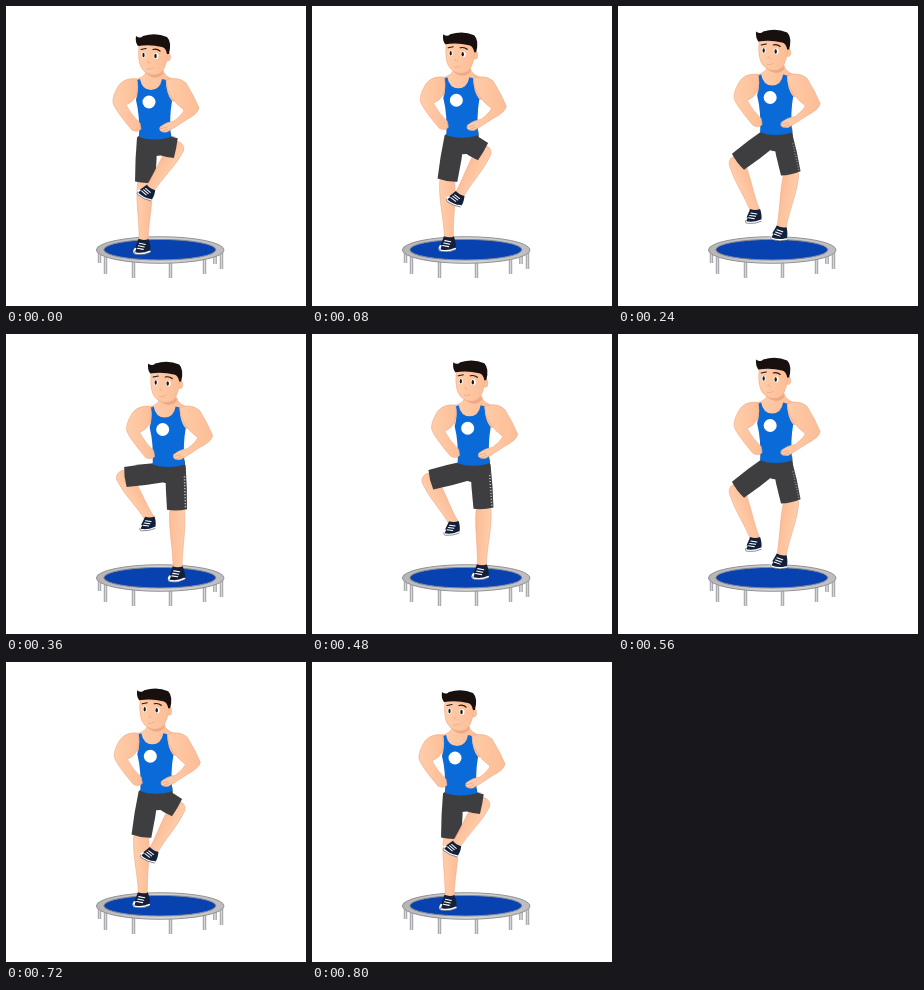
An HTML page without scripts for the animation above (840 ms loop, 300 px wide and 300 px high).

```html
<!DOCTYPE html>
<html lang="en">
<head>
<meta charset="utf-8">
<title>Trampoline knee lifts</title>
<style>
@property --k { syntax: "<number>"; inherits: true; initial-value: 0; }

html, body { margin: 0; width: 100%; height: 100%; overflow: hidden; background: #fff; }

/* --k counts 40 ms steps there and back; --p swings from the left foot (0) to the right (1) */
svg {
  display: block; width: 100vw; height: 100vh;
  animation: count 420ms steps(10) -4ms infinite alternate;
  --p: calc((1 - cos(var(--k) * 18deg)) / 2);
  --bob: calc(-20px * var(--p) * (1 - var(--p)));
}
@keyframes count {
  0% { --k: 0; }
  95.238%, 100% { --k: 10; }
}

.body { transform: translate(calc(14px * var(--p)), var(--bob)); }
.head { transform: translate(calc(12.5px * var(--p)), var(--bob)); }

/* --u is the lift of a leg, --w how far its knee opens sideways */
.left { --u: var(--p); --w: .85; }
.right { --u: calc(1 - var(--p)); --w: .36; }
.mirror { transform: translate(311px, 0) scale(-1, 1); }
.leg {
  --angle: calc(3deg + 83deg * var(--u));
  --knee-x: calc(-46 * var(--w) * sin(var(--angle)));
  --knee-y: calc(46 * cos(var(--angle)));
  transform: translate(calc(141px + 16px * var(--u)), calc(132px + 7px * var(--u) + var(--bob)));
}
.thigh {
  transform: rotate(atan2(-1 * var(--knee-x), var(--knee-y)))
    scale(1, calc(hypot(var(--knee-x), var(--knee-y)) / 46));
}
.shin {
  transform: translate(calc(1px * var(--knee-x)), calc(1px * var(--knee-y)))
    rotate(calc(1.5deg - 34.5deg * var(--u))) scale(1, calc(1 - .15 * var(--u)));
}
.left .shoe { transform: translate(0, 57px) rotate(calc(36deg * var(--u))); }
.right .shoe { transform: translate(0, 57px) scale(-1, 1); }
.trim { opacity: calc(1.5 * var(--p) - .5); }

.skin { fill: url(#skin); stroke: #eeaa86; stroke-width: .6; stroke-linejoin: round; }
.shorts { fill: #3e3e40; }
.line { fill: none; stroke-linecap: round; }
</style>
</head>
<body>
<svg viewBox="0 0 300 300">
  <defs>
    <linearGradient id="skin">
      <stop offset="0" stop-color="#ffcdaa"/>
      <stop offset="1" stop-color="#fcbd96"/>
    </linearGradient>
    <linearGradient id="rim">
      <stop offset="0" stop-color="#b4b4b6"/>
      <stop offset=".5" stop-color="#d6d6d8"/>
      <stop offset="1" stop-color="#bcbcbe"/>
    </linearGradient>
    <g id="post">
      <path d="M0 0V17" stroke="#929396" stroke-width="3.4"/>
      <path d="M0 0V17" stroke="#d3d4d7" stroke-width="1.8"/>
    </g>
    <g id="shoe">
      <path d="M-5-2Q0 0 5-2Q8 6 7 10Q1 14-8 13Q-11 11-8 7Z" fill="#14203a"/>
      <path d="M-8 8Q-10 11-8 12.500Q0 14 6.500 10.500" class="line" stroke="#fff" stroke-width="2"/>
      <path d="M-9 11Q-9 13.500-7 13.700Q1 14.500 7 11.500" class="line" stroke="#39445c" stroke-width=".6"/>
      <path d="M-4 2.500L2 3.500M-5 5L1 6M-6 7.500L0 8.500" class="line" stroke="#fff" stroke-width="1.100"/>
    </g>
    <path id="shin" d="M-7.500 0A7.500 8 0 0 1 7.500 0C8.500 20 4.500 36 4.500 58H-4.500C-4 38-9 20-7.500 0Z"/>
    <path id="thigh" d="M-10 0Q0-12 10 0Q11 22 10 44Q0 46-10 44Q-11 22-10 0Z"/>
  </defs>

  <!-- Trampoline -->
  <use href="#post" x="93.500" y="240"/>
  <use href="#post" x="99.500" y="251"/>
  <use href="#post" x="127.500" y="255"/>
  <use href="#post" x="164.500" y="255"/>
  <use href="#post" x="198.500" y="251"/>
  <use href="#post" x="209" y="241"/>
  <use href="#post" x="215.500" y="246"/>
  <ellipse cx="154.200" cy="244" rx="63.800" ry="13.300" fill="url(#rim)" stroke="#929396"/>
  <ellipse cx="153.800" cy="243.700" rx="56" ry="10.300" fill="#0742b0" stroke="#858892"/>

  <!-- Legs -->
  <g class="leg left">
    <g class="shin">
      <use href="#shin" class="skin"/>
      <use href="#shoe" class="shoe"/>
    </g>
    <use href="#thigh" class="thigh shorts"/>
  </g>
  <g class="mirror">
    <g class="leg right">
      <g class="shin">
        <use href="#shin" class="skin"/>
        <use href="#shoe" class="shoe"/>
      </g>
      <g class="thigh">
        <use href="#thigh" class="shorts"/>
        <path d="M-8.500 8V42" class="trim" stroke="#e8e8e8" stroke-width="1.500" stroke-dasharray="1 2"/>
      </g>
    </g>
  </g>

  <!-- Torso and arms -->
  <g class="body">
    <path class="shorts" d="M134 127H165L166 140Q158 150 150 150Q140 150 132 140Z"/>
    <path class="skin" d="M140 64H157Q158 71 170 74L168 95H131L126 74Q140 72 140 64Z"/>
    <path d="M141 68Q149 75 157 68V65H141Z" fill="#eda885"/>
    <path d="M131 74Q133 86 130 94Q134 110 133 131Q148 136 165 131Q163 112 166 95Q160 88 160 74L156 73Q154 84 145 84Q136 84 134 73Z" fill="#0a6bd8"/>
    <circle cx="143" cy="96" r="6.500" fill="#fff"/>
    <path class="skin" d="M131 73Q120 71 113 79Q106 90 107 97Q109 104 126 124Q132 127 135 123L134 117Q126 110 120 99Q127 96 130 90Q133 82 131 73Z"/>
    <path class="skin" d="M160 74Q172 70 180 77Q188 90 193 102Q192 108 180 114Q168 122 161 126Q152 127 154 121Q160 116 168 115Q177 108 178 104Q170 98 166 92Q160 84 160 74Z"/>
    <path d="M154 123L161 121M156 125.500L162 123" class="line" stroke="#e09b78" stroke-width=".6"/>
  </g>

  <!-- Head -->
  <g class="head">
    <ellipse class="skin" cx="162" cy="51" rx="2.500" ry="4"/>
    <path class="skin" d="M133 39Q131 59 138 65Q146 72 155 67Q162 59 162 41Z"/>
    <path d="M132 40Q129 36 130 30Q134 33 137 30Q150 26 161 31Q166 36 163 48L161 48Q160 42 156 41Q144 38 132 40Z" fill="#17100f"/>
    <path d="M135 43.500L140 42.500M147 43.500Q151 42.500 154 45" class="line" stroke="#241814" stroke-width="1.200"/>
    <g fill="#fff">
      <ellipse cx="137.500" cy="49" rx="2" ry="2.800"/>
      <ellipse cx="150" cy="50" rx="2.500" ry="3"/>
    </g>
    <g fill="#1c1513">
      <ellipse cx="137.500" cy="49" rx="1.100" ry="2.200"/>
      <ellipse cx="149.500" cy="50" rx="1.200" ry="2.300"/>
    </g>
    <path d="M142 55Q141 57 144 57M141 63Q144 64 147 62" class="line" stroke="#e9a583" stroke-width=".7"/>
  </g>
</svg>
</body>
</html>
```
